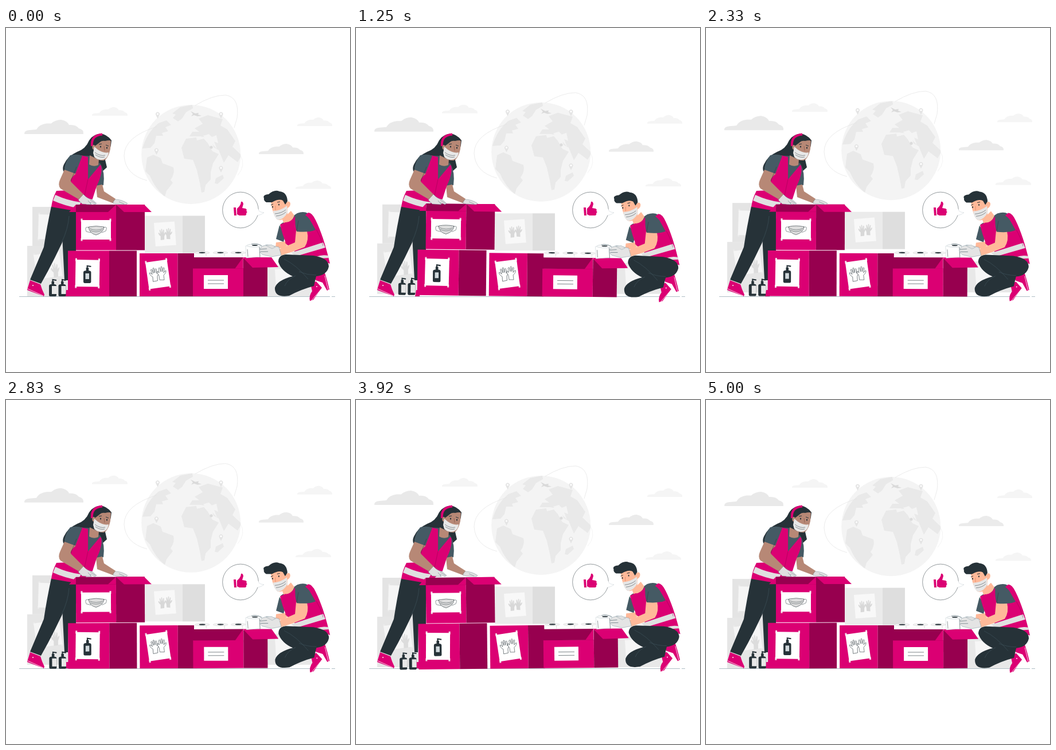
Recreate the animation shown at these times as an HTML page with a canvas. Size 600 px wide and 600 px high, loop 5080 ms.

```html
<!DOCTYPE html>
<html lang="en">
<head>
<meta charset="utf-8">
<title>Packing supplies</title>
<style>
html, body { margin: 0; width: 100%; height: 100%; overflow: hidden; background: #fff; }
canvas { display: block; width: 600px; height: 600px; }
</style>
</head>
<body>
<canvas id="stage"></canvas>
<script>
const LOOP = 5080, STEPS = 61;
const PINK = '#db0073', DEEP = '#97004f', INK = '#263238', SHIRT = '#455a64';
const LIGHT = '#ebebeb', MID = '#e0e0e0', BROWN = '#b78876', TAN = '#ffb999';
const PIVOT = [310, 345];

const canvas = document.getElementById('stage');
const ctx = canvas.getContext('2d');
const ratio = window.devicePixelRatio || 1;
canvas.width = canvas.height = 600 * ratio;

function shape(d, fill, stroke, width = 0.6) {
  const path = new Path2D(d);
  if (fill) { ctx.fillStyle = fill; ctx.fill(path); }
  if (stroke) { ctx.strokeStyle = stroke; ctx.lineWidth = width; ctx.stroke(path); }
}
const line = (d, color = INK, width = 0.6) => shape(d, null, color, width);

function rect(x, y, w, h, fill) {
  ctx.fillStyle = fill;
  ctx.fillRect(x, y, w, h);
}

function oval(x, y, rx, ry, fill, stroke, width = 0.6) {
  ctx.beginPath();
  ctx.ellipse(x, y, rx, ry, 0, 0, 7);
  if (fill) { ctx.fillStyle = fill; ctx.fill(); }
  if (stroke) { ctx.strokeStyle = stroke; ctx.lineWidth = width; ctx.stroke(); }
}

function at(x, y, sx, sy, angle, draw) {
  ctx.save();
  ctx.translate(x, y);
  ctx.rotate(angle);
  ctx.scale(sx, sy);
  draw();
  ctx.restore();
}

function cloud(x, y, w, h, color) {
  at(x, y, w / 103, h / 25, 0, () => shape(
    'M0 25Q-1 19 9 18L21 17Q26 8 39 6.500L47 6.500Q54 0 64 0Q75 2 78 9Q90 8 95 15Q104 17 103 25Z', color));
}

function pin(x, y) {
  shape(`M${x} ${y + 6}L${x - 3} ${y}A3.500 3.500 0 1 1 ${x + 3} ${y}Z`, '#e4e4e4');
  oval(x, y - 2, 1.7, 1.7, '#fff');
}

function glove(x, y, sx, sy, angle, fill, stroke) {
  at(x, y, sx, sy, angle, () => shape(
    'M3 26L4 17Q-1 12 0 8Q2 8 4 12L3 3Q4 1 5 3L6.500 10L7 1Q8 -1 9 1L9 10L11 3Q12 1 13 4L12 12L15 9Q17 10 12 18L11 26Z',
    fill, stroke));
}

function paper(x, y, w, h, angle, fill = '#fff', tab = '#f3d9e6') {
  at(x, y, 1, 1, angle, () => {
    for (const px of [1, w - 1]) for (const py of [0, h]) rect(px - 1.5, py - 2.5, 3, 5, tab);
    rect(0, 0, w, h, fill);
  });
}

function bottle(x, y, s) {
  at(x, y, s, s, 0, () => {
    shape('M0 12Q0 9 4 9L9 9Q13 9 13 12L13 28Q13 30 11 30L2 30Q0 30 0 28Z', INK);
    rect(4.5, 4, 4.5, 6, INK);
    line('M6.500 6L6.500 1L13 2', INK, 2);
  });
}

function globe() {
  oval(322.7, 220.5, 86.5, 86.5, '#f4f4f4');
  ctx.save();
  ctx.clip();
  shape('M266 166L280 161L288 169L278 173L283 180L272 183L274 188L262 188L259 201L252 209L238 210Q246 182 266 166Z', '#e9e9e9');
  shape('M291 157L296 151L290 149L304 138L325 134L326 140L314 147L307 158L300 163Z', '#e9e9e9');
  shape('M246 226L257 221L270 227L273 236L292 243Q295 254 287 265L291 270L280 284L277 294Q260 280 251 258L243 250Z', '#e9e9e9');
  shape('M306 209L314 193L332 191L333 196L345 193L352 201L360 215L371 220L361 236L357 252L357 264L348 274L346 286L341 287L338 270L333 248L326 230L311 228Z', '#e9e9e9');
  shape('M366 262L378 256L380 262L369 272L364 271Z', '#e9e9e9');
  shape('M320 189L325 181L337 181L329 175L343 167L336 158L352 152L378 159L374 170L386 177L400 197L395 207L411 222L404 234L388 222L380 235L371 213L362 208L357 192L338 189Z', '#e9e9e9');
  shape('M344 188L354 185L359 190L367 187L370 201L363 198L368 211L359 201L350 195Z', '#f4f4f4');
  ctx.restore();
  line('M330 135Q360 117 383 117Q408 121 403 157L398 174', '#e3e3e3', 0.7);
  line('M263 172Q206 190 206 223Q208 256 246 266', '#e3e3e3', 0.7);
  line('M409 222Q419 240 404 257', '#eee', 0.7);
  [[264.5, 152], [375, 152], [262.5, 215], [375, 246]].forEach(p => pin(...p));
  shape('M322 145L330 149L336 148L335 151L341 153L334 154L328 152L323 154L326 150Z', '#dadada');
  oval(358, 208, 2.6, 2.6, '#dcdcdc');
}

function backdrop() {
  globe();
  cloud(32, 160, 103, 25, '#e9e9e9');
  cloud(150, 138, 62, 15, '#f5f5f5');
  cloud(508, 156, 61, 15, '#f5f5f5');
  cloud(441, 202, 78, 18, LIGHT);
  cloud(505, 266, 62, 14.5, '#f5f5f5');

  rect(46, 312, 66, 68, '#e4e4e4');
  paper(57, 325, 42, 43, 0.03, '#f5f5f5', LIGHT);
  rect(37, 380, 76, 88, '#e6e6e6');
  paper(48, 396, 45, 43, -0.14, '#f5f5f5', LIGHT);
  glove(77, 411, 0.95, 0.95, -0.15, '#dcdcdc');

  rect(242, 327.5, 66, 65, LIGHT);
  rect(308, 327.5, 39, 65, '#dedede');
  paper(258, 340, 36, 41, -0.07, '#f8f8f8', LIGHT);
  glove(265, 351, 0.8, 0.75, -0.12, '#d8d8d8');
  glove(290, 349, -0.8, 0.75, 0.05, '#d8d8d8');

  rect(455, 414, 79, 54, '#e8e8e8');
  paper(469, 421, 35, 34, -0.06, '#f6f6f6', LIGHT);
}

function woman() {
  shape('M149 191Q168 176 184 196Q183 213 173 230L176 243L167 251L150 240L137 223L119 230Q108 236 105 254Q96 249 101 238Q107 224 124 216Q139 211 145 196Z', INK);
  shape('M98 362L104 325L122 318L122 392L109 392L108 440L102 440Z', INK);
  shape('M79 311L122 318L109 350Q85 404 61 446L42 439L66 382Q71 348 79 311Z', INK);
  line('M110 328Q108 352 97 374', SHIRT, 0.5);
  shape('M42 440L60 447L63 456L67 465L66 468L37 457L38 453Z', PINK);
  line('M38 455L65 467', '#fff', 0.8);
  oval(47, 449, 1, 1, '#fff');
  shape('M105 457L111 457L111 468L103 468Z', PINK);

  shape('M113 222L145 223L165 237Q173 252 170 274L157 277L148 302L104 250L102 243Q105 231 113 222Z', SHIRT);
  shape('M146 222L162 230L161 239Q153 243 145 238Z', BROWN);
  shape('M157 275L168 273L171 285L191 298L188 306L159 295Z', BROWN);
  shape('M131 222L143 225L143 264L164 239L166 240Q169 254 158 276L151 298L126 320L79 312Q81 297 88 284L114 283L112 262Z', PINK);
  shape('M86 291Q107 301 131 304L125 314Q102 310 82 301Z', MID);
  line('M143 264L137 292', DEEP, 0.5);
  shape('M102 247L122 254Q111 263 113 268L135 290L129 300Q108 288 95 280Q90 274 94 265Z', BROWN);
  shape('M112 222Q125 219 133 223L121 254L102 247Q104 231 112 222Z', SHIRT);
  line('M123 242L113 267', INK, 0.5);

  shape('M154 202Q166 192 183 194L182 211Q178 229 170 231Q159 232 153 222Z', BROWN);
  shape('M153 207Q154 193 168 188Q181 189 184 197Q180 195 173 197Q167 196 164 199Q158 204 153 207Z', INK);
  line('M150 206Q148 187 168 185.500', PINK, 4);
  oval(153, 208, 2.6, 4, BROWN);
  shape('M154 207L160 212Q170 219 179 217Q178 226 171 229Q161 232 154 225L152 218Z', '#e8e8e8');
  line('M155 217Q164 224 173 222M156 221Q164 227 172 225', INK, 0.5);
  oval(165, 207, 1.1, 1.5, INK);
  oval(176, 209, 1.1, 1.5, INK);
  line('M162 203L167 202M174 204L179 206', INK, 1);
  line('M171 206L172 214', '#80503f', 0.6);
}

function womanGloves() {
  shape('M126 300L135 290Q142 298 150 299L158 306L155 308L147 304L149 308L133 307Z', MID, '#546e7a', 0.4);
  line('M143 301L148 307M147 300L156 306', '#546e7a', 0.5);
  shape('M186 305L190 299Q202 299 212 306L210 308L192 307Z', MID, '#546e7a', 0.4);
  line('M197 303L206 307', '#546e7a', 0.5);
}

// Opened top of a carton: dark inside, then the flap folded to the right.
function opening(left, corner, y, depth, flap) {
  rect(left, y, corner - left, depth, DEEP);
  shape(`M${corner} ${y}V${y + depth}H${corner - 14}Z`, PINK);
  shape(flap, PINK);
}

function supplies() {
  for (const x of [75, 91.5]) {
    bottle(x, 438, 1);
    rect(x + 5, 450, 8, 14, '#e8e8e8');
  }
  rect(108, 388.5, 72, 79.5, PINK);
  rect(180, 388.5, 48, 79.5, DEEP);
  paper(121.5, 404, 42, 47, 0.015);
  bottle(135, 414, 1.03);
  rect(138.5, 428, 6.5, 10, '#cfd8dc');

  rect(122, 320, 70, 67.5, PINK);
  rect(192, 308, 50, 79.5, DEEP);
  opening(122, 192, 308, 13, 'M192 308L241 308L254 321L206 321Z');
  shape('M122 308L110 321L122 321Z', PINK);
  paper(131, 335, 52, 34, 0);
  shape('M144 347Q157 344 171 347Q170 357 157 361Q145 358 144 347Z', '#dedede', INK);
  line('M145 348Q136 345 140 355L148 357M170 348Q178 345 174 354L167 357M146 350Q157 355 169 350M147 353Q157 358 167 353', INK, 0.5);

  rect(233, 393, 66.5, 75, PINK);
  rect(299.5, 393, 28.5, 75, DEEP);
  paper(243, 409, 38, 47, -0.14);
  glove(249, 420, 1, 0.9, -0.2, '#fff', INK);
  glove(279, 416, -1, 0.9, 0, '#fff', INK);

  for (const x of [342, 374, 405]) {
    rect(x - 14, 392, 28, 8, '#fff');
    line(`M${x + 7} 393V399`, '#bbb', 0.5);
    oval(x, 392, 13, 2.2, '#f5f5f5', '#cfcfcf', 0.5);
    oval(x, 391.8, 5.5, 1.1, INK);
  }
  rect(326, 419, 88, 49, PINK);
  rect(414, 402, 42, 66, DEEP);
  opening(326, 413.5, 400, 19.5, 'M413 400L463 400L475 417L430 418Z');
  rect(345, 431, 42, 24, '#fff');
  line('M352 440H380M352 446H380', INK, 0.6);
}

function man() {
  shape('M538 432L556 427Q560 439 564 456L560 458L552 444L540 440Z', PINK);
  line('M556 432L562 457', '#fff', 0.8);
  shape('M531 445L541 442L551 453L536 474L530 476Q528 467 534 459Z', PINK);
  line('M551 454L533 475', '#fff', 0.8);
  oval(542, 451, 1, 1, '#fff');

  shape('M471 374L487 372L493 377L483 385L470 383Z', TAN);
  shape('M479 342L490 335L508 323Q525 317 533 330L552 365L563 404L507 397Z', SHIRT);
  shape('M482 334L497 319L503 327Q498 340 486 345Z', TAN);
  shape('M506 340L527 322Q534 322 540 335Q554 363 565 411Q548 405 512 397L487 375Z', PINK);
  shape('M477 344L471 368L484 373L488 360Z', SHIRT);
  shape('M478 343L487 339Q496 340 504 328L507 356L505 373L488 375Q482 360 478 343Z', PINK);
  shape('M497 392L553 374L557 383L506 398Z', MID);
  shape('M541 399Q551 395 562 397L563 401L546 402Z', MID);
  line('M541 351Q549 364 553 380', DEEP, 0.5);

  shape('M475 408Q475 396 488 395L536 397Q563 401 563 416Q560 431 541 433L537 450Q514 456 494 467Q468 471 469 453Q473 440 500 433Q480 424 475 408Z', INK);
  line('M485 403Q506 413 527 438M541 431Q525 431 511 425M505 432Q491 438 486 450', SHIRT, 0.5);

  shape('M506 353L525 354Q529 370 521 382Q500 391 479 397L476 386L504 374Z', TAN);
  shape('M505 329Q517 318 529 333L540 352Q529 357 507 355Q503 341 505 329Z', SHIRT);
  line('M510 336L507 354', INK, 0.5);

  // Roll in hand
  shape('M418 380L442 380L443 399L419 401Z', '#fff', '#cfd8dc', 0.7);
  oval(433, 379.5, 13, 2.6, '#fafafa', '#b0bec5', 0.5);
  oval(434, 379, 5, 1, INK);
  line('M442 382L443 400M421 386L422 399', INK, 0.5);
  shape('M442 387L446 381L455 378L476 382L480 396L463 399L447 395L443 391Z', '#e4e4e4', '#78909c', 0.5);
  line('M443 386L455 385M444 390L457 390M428 377Q436 374 446 380', SHIRT, 0.6);
  shape('M453 379L463 378L470 382L464 385Z', MID, '#78909c', 0.4);

  // Head
  shape('M462 304Q469 297 482 296L487 306Q494 299 496 306Q496 312 491 314L491 326Q482 338 473 334Q465 325 462 304Z', TAN);
  shape('M450 297Q447 291 458 290Q468 281 477 285Q490 286 491 302L487 308L483 301Q476 297 464 304L454 304Q449 301 450 297Z', INK);
  shape('M466 319Q479 319 490 310L491 322Q485 333 475 335Q467 331 466 319Z', '#e6e6e6');
  line('M469 324Q481 323 488 317M471 328Q482 327 488 321', INK, 0.5);
  oval(465, 312, 1, 1.5, INK);
  oval(476, 308, 1, 1.5, INK);
  line('M462 309L466 307M473 304L478 303', INK, 1);
  line('M470 310L470 318', '#d77955', 0.6);
}

function bubble() {
  oval(409, 317.5, 31.3, 31.3, '#fff', INK, 0.5);
  shape('M439 315Q443 321 450 322Q444 326 438 327Z', '#fff');
  line('M440 318Q444 322 450 322Q445 326 439 327', '#b0bec5', 0.4);
  shape('M397 313L401 313L402 327L398 327Z', PINK);
  shape('M403 315L407 311Q410 307 410 303Q413 302 414 307L412 314L418 315Q421 317 419 319Q422 321 419 323Q420 326 417 327L407 327L403 325Z', PINK);
}

function draw(ms) {
  const step = Math.floor(ms % LOOP * STEPS / LOOP + 0.05) % STEPS;
  const phase = step / STEPS * Math.PI * 2;
  const lift = 3.5 * (Math.cos(phase + 0.27) - Math.cos(0.27));
  const tilt = 0.0105 * Math.sin(phase);

  ctx.setTransform(ratio, 0, 0, ratio, 0, 0);
  rect(0, 0, 600, 600, '#fff');
  at(0, lift, 1, 1, 0, backdrop);
  line('M23 468.500H565M568 468.500H574', '#607d8b', 0.5);
  woman();
  const swing = part => at(...PIVOT, 1, 1, tilt, () => {
    ctx.translate(-PIVOT[0], -PIVOT[1]);
    part();
  });
  swing(supplies);
  womanGloves();
  bubble();
  swing(man);
}

const start = performance.now();
function tick() {
  draw(performance.now() - start);
  requestAnimationFrame(tick);
}
tick();
</script>
</body>
</html>
```
